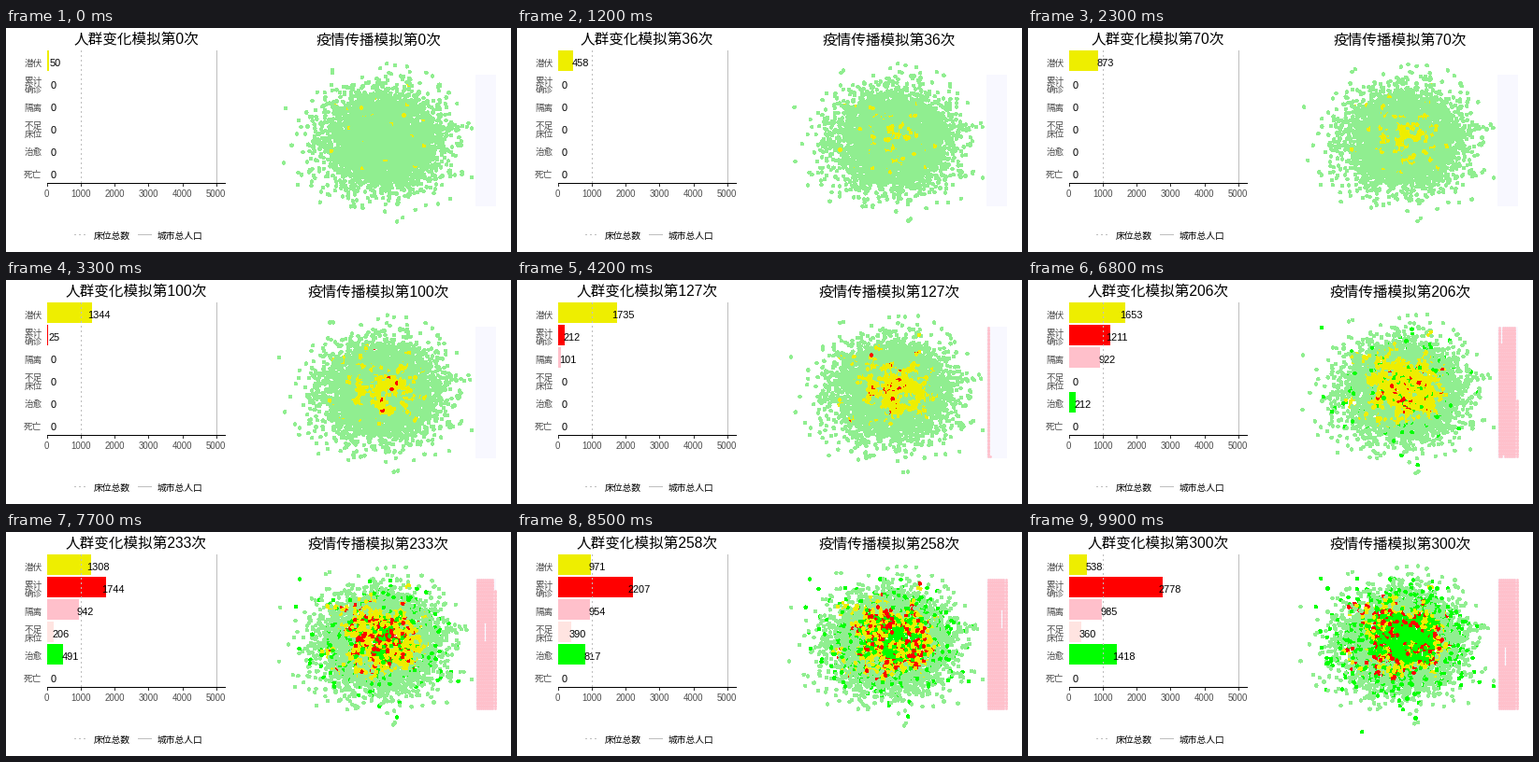
Recreate the animation shown at these times as a matplotlib script. Size 540 by 240 pixels, loop 10 s.

```python
import matplotlib.pyplot as plt
import numpy as np
from matplotlib.animation import FuncAnimation
from matplotlib.colors import to_rgba_array
from matplotlib.patches import Rectangle

W, H, DPI = 540, 240, 80
FRAMES, DAYS, PEOPLE, BEDS = 100, 300, 5000, 1000
PX = 72 / DPI
GREY, LINE = "#4D4D4D", "#BEBEBE"
YELLOW = "#EEEE00"

plt.rcParams["font.family"] = ["Liberation Sans", "Noto Sans CJK JP"]


def smooth(x, kx, ky):
    """Monotone cubic curve through the points (kx, ky)."""
    h = np.diff(kx)
    d = np.diff(ky) / h
    m = np.r_[d[0], np.zeros(len(d) - 1), d[-1]]
    same = d[:-1] * d[1:] > 0
    m[1:-1][same] = 2 * d[:-1][same] * d[1:][same] / (d[:-1] + d[1:])[same]
    i = np.clip(np.searchsorted(kx, x, "right") - 1, 0, len(h) - 1)
    t = (x - kx[i]) / h[i]
    return ((1 + 2 * t) * (1 - t) ** 2 * ky[i] + t * (1 - t) ** 2 * h[i] * m[i]
            + t * t * (3 - 2 * t) * ky[i + 1] + t * t * (t - 1) * h[i] * m[i + 1])


KEY_DAYS = np.array([0, 70, 103, 127, 167, 206, 258, 300])


def course(*tail):
    """Daily counts: zero at first, then through the given last key values."""
    keys = np.r_[np.zeros(len(KEY_DAYS) - len(tail)), tail]
    return np.rint(smooth(day, KEY_DAYS, keys)).astype(int)


day = np.rint(np.linspace(0, DAYS, FRAMES)).astype(int)
latent = course(50, 873, 1390, 1735, 1970, 1653, 971, 538)
confirmed = course(30, 212, 540, 1211, 2207, 2778)
isolated = course(101, 456, 922, 954, 985)
short = course(390, 360)
cured = course(6, 212, 817, 1418)
dead = course()
counts = np.c_[latent, confirmed, isolated, short, cured, dead]

# People: home positions, slow wandering, and the order in which they fall ill
rng = np.random.default_rng(12)
CENTRE, SPREAD = (403, 119), (29.5, 24)
unit = rng.normal(size=(PEOPLE, 2))
home = unit * SPREAD + CENTRE
released = rng.normal(size=(PEOPLE, 2)) * SPREAD + CENTRE
wander = rng.normal(0, 0.3, (FRAMES, PEOPLE, 2)).cumsum(axis=0)

seeds = home[rng.choice(PEOPLE, 50, replace=False)]
gap = np.hypot(*(home[:, None] - seeds).transpose(2, 0, 1)).min(axis=1)
risk = gap * (1 + 0.7 * (unit ** 2).sum(axis=1)) * rng.uniform(0.8, 1.2, PEOPLE)
ill_rank = risk.argsort().argsort()
sick_rank = (ill_rank + rng.uniform(0, 1000, PEOPLE)).argsort().argsort()

HEALTHY, ILL, SICK, IN_BED, WELL = range(5)
TINT = to_rgba_array(["lightgreen", YELLOW, "red", "pink", "lime"])

fig = plt.figure(figsize=(W / DPI, H / DPI), dpi=DPI, facecolor="white")
ax = fig.add_axes([0, 0, 1, 1])
ax.set(xlim=(0, W), ylim=(H, 0))
ax.axis("off")


def label(x, y, text, size, color="black", ha="center"):
    return ax.text(x, y + 0.37 * size, text, fontsize=size * PX, color=color,
                   ha=ha, va="baseline")


def line(xs, ys, color, style="-", z=3):
    ax.plot(xs, ys, color=color, ls=style, lw=PX, antialiased=False, zorder=z)


def box(x, y, w, h, color):
    return ax.add_patch(Rectangle((x, y), w, h, fc=color, lw=0, antialiased=False))


def dots(size, **kw):
    return ax.scatter([], [], s=(size * PX) ** 2, linewidths=0,
                      antialiased=False, **kw)


# Bar chart
X0, UNIT, BASE = 43.7, 36.2 / 1000, 165.5
DOTTED = (0, (1, 3))
ROWS = [("潜伏", YELLOW), ("累计\n确诊", "red"), ("隔离", "pink"),
        ("不足\n床位", "mistyrose"), ("治愈", "lime"), ("死亡", "black")]

bars, values = [], []
for i, (name, fill) in enumerate(ROWS):
    y = 37.2 + 23.9 * i
    parts = name.split("\n")
    for j, part in enumerate(parts):
        label(38.5, y + 9 * (j - (len(parts) - 1) / 2), part, 9.6, GREY, "right")
    bars.append(box(X0, 24 + 24.1 * i, 0, 21.5, fill))
    values.append(label(0, y, "", 11))

line([X0 + BEDS * UNIT] * 2, [24, BASE], LINE, DOTTED)
line([X0 + PEOPLE * UNIT] * 2, [24, BASE], LINE)
line([X0, 234], [BASE, BASE], "black", z=4)
for v in range(0, PEOPLE + 1, 1000):
    x = X0 + v * UNIT
    line([x, x], [BASE, BASE + 3], "#333333")
    label(x, 177, str(v), 9.6, GREY)

line([73, 88], [220.5, 220.5], LINE, DOTTED)
label(94, 222, "床位总数", 9.8, ha="left")
line([141, 155], [220.5, 220.5], LINE)
label(162, 222, "城市总人口", 9.8, ha="left")

titles = [(label(139, 11.5, "", 15.6), "人群变化模拟第{}次"),
          (label(398, 11.5, "", 15.6), "疫情传播模拟第{}次")]

# Map and hospital: beds fill in columns of 100, from the bottom up
box(502, 50, 22, 140.5, "ghostwhite")
bed = np.arange(BEDS)
bed_xy = np.c_[503.6 + 2.1 * (bed // 100), 188.6 - 1.385 * (bed % 100)]
crowd = dots(3.4)
ward = dots(2.7, color="pink")


def beds_in_use(k):
    """Beds empty in the order they were filled, leaving a moving gap."""
    filled = bed < isolated[k] + 0.1 * cured[k]
    vacated = (0.95 * cured[k] - bed) % BEDS < min(15, cured[k])
    return filled & ~vacated


def update(k):
    for text, form in titles:
        text.set_text(form.format(day[k]))
    for bar, text, v in zip(bars, values, counts[k]):
        bar.set_width(v * UNIT)
        text.set_text(str(v))
        text.set_x(X0 + v * UNIT + 7.3)

    state = np.full(PEOPLE, HEALTHY)
    state[ill_rank < latent[k] + confirmed[k]] = ILL
    state[sick_rank < confirmed[k]] = SICK
    state[sick_rank < isolated[k] + cured[k]] = IN_BED
    state[sick_rank < cured[k]] = WELL

    xy = np.where((state == WELL)[:, None], released, home) + wander[k]
    xy -= np.array([4, 2.5]) * day[k] / DAYS
    xy[:, 0] = np.minimum(xy[:, 0], 498)
    out = state != IN_BED
    crowd.set_offsets(xy[out])
    crowd.set_facecolors(TINT[state[out]])
    ward.set_offsets(bed_xy[beds_in_use(k)])
    return []


anim = FuncAnimation(fig, update, frames=FRAMES, interval=100, repeat=True,
                     repeat_delay=0, init_func=lambda: [])
plt.show()
```
